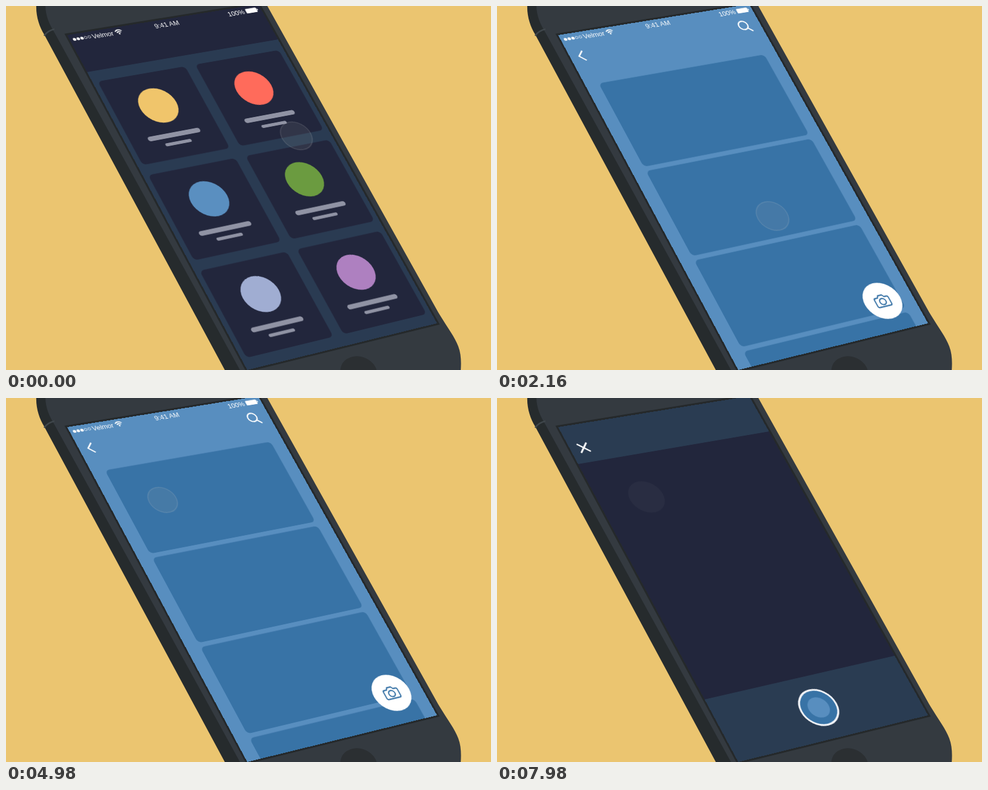
Animation of 800x600 px, one loop 8 s. Source, as an HTML page:

```html
<!DOCTYPE html>
<html lang="en">
<head>
<meta charset="utf-8">
<title>Phone walkthrough</title>
<style>
  html, body { margin: 0; width: 100%; height: 100%; overflow: hidden; background: #ebc570; }
  #stage { position: relative; width: 800px; height: 600px; overflow: hidden; background: #ebc570; }
  #stage > svg { position: absolute; left: 0; top: 0; }
  #screen { position: absolute; left: 0; top: 0; width: 375px; height: 667px; overflow: hidden; transform-origin: 0 0; background: #2a3b52; }
  #screen svg { display: block; }
  text { font: 13px "Liberation Sans", Arial, sans-serif; fill: #fff; }
  .line { fill: none; stroke: #fff; stroke-width: 2.5; }
  .icon { fill: none; stroke: #3873a6; stroke-width: 2.3; stroke-linejoin: round; }
</style>
</head>
<body>
<div id="stage">
  <svg width="800" height="600">
    <path fill="#262b2d" d="M50 -2C49 16 55 34 63 47L362 602H420V-2Z"/>
    <path fill="#343a40" d="M65 -2C65 16 71 29 80 44L387 602H750C751 588 751 574 746 561C740 545 728 530 713 505L430 -2Z"/>
    <path fill="none" stroke="#3f464b" stroke-width="2.5" d="M63 49Q68 41 80 38"/>
    <ellipse cx="582" cy="604" rx="31" ry="26" fill="#2b2f32" transform="rotate(20 582 604)"/>
    <path id="rim" fill="#25292b" stroke="#25292b" stroke-width="6"/>
  </svg>
  <div id="screen">
    <svg width="375" height="667" viewBox="0 0 375 667">
      <defs>
        <clipPath id="listClip"><rect y="67.5" width="375" height="600"/></clipPath>
      </defs>
      <g id="home"><rect width="375" height="76" fill="#22263c"/></g>
      <circle id="flood" cx="92.5" cy="352" fill="#588ebf"/>
      <g clip-path="url(#listClip)"><g id="list"></g></g>
      <path id="heart" fill="#fff" d="M0 9C-4 5 -10 1 -10 -4C-10 -10 -3 -11 0 -5.5C3 -11 10 -10 10 -4C10 1 4 5 0 9Z"/>
      <g id="nav" class="line">
        <path d="M26.5 37L16.5 46.5L26 56.5"/>
        <circle cx="341.5" cy="40" r="8.8"/>
        <path d="M347.5 46.5L355 54"/>
      </g>
      <g id="fab">
        <circle r="35.5" fill="#fff"/>
        <path class="icon" d="M-11 -7H-6.5L-4 -11H4L6.5 -7H11Q14 -7 14 -4V8Q14 11 11 11H-11Q-14 11 -14 8V-4Q-14 -7 -11 -7Z"/>
        <circle class="icon" cy="1.5" r="6"/>
      </g>
      <g id="status">
        <text x="42" y="15">Velmor</text>
        <text x="186" y="15" text-anchor="middle">9:41 AM</text>
        <text x="341" y="15" text-anchor="end">100%</text>
        <path fill="none" stroke="#fff" stroke-width="1.7" d="M86.5 8.5Q93 2.5 99.5 8.5M89 11.2Q93 7.3 97 11.2"/>
        <circle cx="93" cy="13.3" r="1.5" fill="#fff"/>
        <rect x="344.5" y="5.5" width="22" height="9.5" rx="1.5" fill="#fff"/>
        <rect x="367" y="8.5" width="1.5" height="3.5" fill="#fff"/>
      </g>
      <g id="camera">
        <rect width="375" height="667" fill="#2a3c52"/>
        <rect y="76" width="375" height="470" fill="#22263c"/>
        <path class="line" style="stroke-width:3" d="M16 38L34 56M34 38L16 56"/>
        <circle cx="188" cy="606.5" r="34" fill="#3873a6" stroke="#f2f4f8" stroke-width="3.5"/>
        <circle cx="188" cy="606.5" r="19.5" fill="#588ebf"/>
      </g>
      <circle id="touch" fill="#aaa" stroke="#ccc" stroke-width="1.8"/>
    </svg>
  </div>
</div>
<script>
const LOOP = 8000, W = 375, H = 667;
const $ = id => document.getElementById(id);
const set = (el, attrs) => { for (const k in attrs) el.setAttribute(k, attrs[k]); return el; };
const add = (parent, tag, attrs) =>
  parent.appendChild(set(document.createElementNS('http://www.w3.org/2000/svg', tag), attrs));

const clamp = x => Math.min(1, Math.max(0, x));
const prog = (t, a, b) => clamp((t - a) / (b - a));
const lerp = (a, b, p) => a + (b - a) * p;
const smooth = (t, a, b) => { const x = prog(t, a, b); return x * x * (3 - 2 * x); };
const inOut = (t, a, b) => { const x = prog(t, a, b); return x < .5 ? 2 * x * x : 1 - 2 * (1 - x) ** 2; };
const pop = (t, a, b) => { const x = prog(t, a, b) - 1; return t < a ? 0 : 1 + 2.7 * x ** 3 + 1.7 * x * x; };

// Perspective placement of the flat screen: corners clockwise from top left
const corners = [[101, 48], [416, -3], [711, 523], [398, 600]];
function placeScreen() {
  const [[x0, y0], [x1, y1], [x2, y2], [x3, y3]] = corners;
  const sx = x0 - x1 + x2 - x3, sy = y0 - y1 + y2 - y3;
  const ax = x1 - x2, ay = y1 - y2, bx = x3 - x2, by = y3 - y2;
  const det = ax * by - bx * ay;
  const g = (sx * by - bx * sy) / det, h = (ax * sy - sx * ay) / det;
  const m = [
    (x1 - x0 + g * x1) / W, (y1 - y0 + g * y1) / W, 0, g / W,
    (x3 - x0 + h * x3) / H, (y3 - y0 + h * y3) / H, 0, h / H,
    0, 0, 1, 0, x0, y0, 0, 1
  ];
  $('screen').style.transform = `matrix3d(${m.map(v => v.toFixed(9))})`;
  $('rim').setAttribute('d', 'M' + corners.join('L') + 'Z');
}
placeScreen();

['#f0c56b', '#ff6b5b', '#5a8fc0', '#6b9b40', '#a0add2', '#ae80c0'].forEach((fill, i) => {
  const x = 9.5 + i % 2 * 188, y = 97 + (i >> 1) * 189.8;
  const g = add($('home'), 'g', { transform: `translate(${x} ${y})` });
  const bar = (y, w, h) => add(g, 'rect', { x: 83 - w / 2, y, width: w, height: h, rx: h / 2, fill: '#9093a4' });
  add(g, 'rect', { width: 168, height: 169.5, rx: 8, fill: '#22263c' });
  add(g, 'circle', { cx: 83, cy: 64.9, r: 34.7, fill });
  bar(120, 100, 9);
  bar(138, 50, 6);
});

const cards = [0, 1, 2, 3].map(() =>
  add($('list'), 'rect', { x: 25, width: 325.5, rx: 8, fill: '#3873a6' }));

for (let i = 0; i < 5; i++) {
  const full = i < 3;
  add($('status'), 'circle', {
    cx: 8.8 + i * 7, cy: 10.3, r: full ? 2.9 : 2.4,
    fill: full ? '#fff' : 'none', stroke: full ? 'none' : '#fff', 'stroke-width': .8
  });
}

// The list rises past its place, settles, is pulled down, then springs back;
// the first card overshoots while the rest follow damped
const RELEASE = 2700;
function offset(i, t) {
  if (t < RELEASE)
    return 620 - 659.5 * smooth(t, 1000, 1680) + 39.5 * smooth(t, 1680, 2040) + 98 * smooth(t, 2040, 2640);
  const s = (t - RELEASE) / 1000;
  return 98 * Math.exp(-5.2 * s) * (i ? 1 : Math.cos(4.03 * s));
}

// Each gesture moves at once, may tap, and fades at both ends
const onCard = [97.7, 168], onFab = [315.5, 607];
const gestures = [
  { show: [-200, 620], from: [309.6, 267.6], to: [92.5, 352], moved: 400, tap: 480 },
  { show: [1620, 2820], from: [202, 463], to: [203, 400], moved: 2040, drag: true },
  { show: [3300, 5220], from: [192, 200], to: onCard, moved: 4600, tap: 5040 },
  { show: [5480, 5860], from: onCard, to: onCard, moved: 5600, tap: 5700 },
  { show: [6940, 7260], from: [290, 530], to: onFab, moved: 7110, tap: 7140 },
  { show: [7920, 8400], from: [88, 160], to: [88, 160], moved: 8000 }
];
function drawTouch(t) {
  const g = gestures.find(g => t >= g.show[0] && t <= g.show[1]);
  $('touch').style.display = g ? '' : 'none';
  if (!g) return;
  const [a, b] = g.show;
  const fade = Math.min(prog(t, a, a + 120), prog(t, b, b - 120));
  const press = g.tap ? clamp(1 - Math.abs(t - g.tap) / 120) : 0;
  const p = smooth(t, Math.max(0, a), g.moved);
  const pull = g.drag ? Math.max(0, offset(0, Math.min(t, RELEASE - 1))) : 0;
  set($('touch'), {
    cx: lerp(g.from[0], g.to[0], p),
    cy: lerp(g.from[1], g.to[1], p) + pull,
    r: 28.5 + 6 * (1 - fade) - 6 * press,
    'fill-opacity': .11 * fade + .03 * press,
    'stroke-opacity': .16 * clamp(fade * 2 - 1)
  });
}

function draw(t) {
  $('flood').setAttribute('r', t < 480 ? 0 : 34.7 + 440 * inOut(t, 480, 1110));
  $('nav').setAttribute('opacity', prog(t, 900, 1100));

  const grow = 410 * (inOut(t, 5100, 5600) - inOut(t, 6200, 6700));
  cards.forEach((card, i) => set(card, {
    y: 93.5 + 178 * i + offset(i, t) + (i ? grow : 0),
    height: 169.5 + (i ? 0 : grow)
  }));

  $('heart').setAttribute('transform', `translate(47 116.5) scale(${pop(t, 5720, 6000)})`);
  $('fab').setAttribute('transform', `translate(315.5 607.5) scale(${pop(t, 1200, 1560)})`);

  // The camera view grows out of the round button's box
  const open = inOut(t, 7200, 7740);
  const sx = lerp(71, W, open) / W, sy = lerp(71, H, open) / H;
  set($('camera'), {
    opacity: Math.min(1, open * 1.15),
    transform: `translate(${lerp(280, 0, open)} ${lerp(572, 0, open)}) scale(${sx} ${sy})`
  });
  drawTouch(t);
}

const start = performance.now();
function tick() {
  draw((performance.now() - start) % LOOP);
  requestAnimationFrame(tick);
}
draw(0);
requestAnimationFrame(tick);
</script>
</body>
</html>
```
